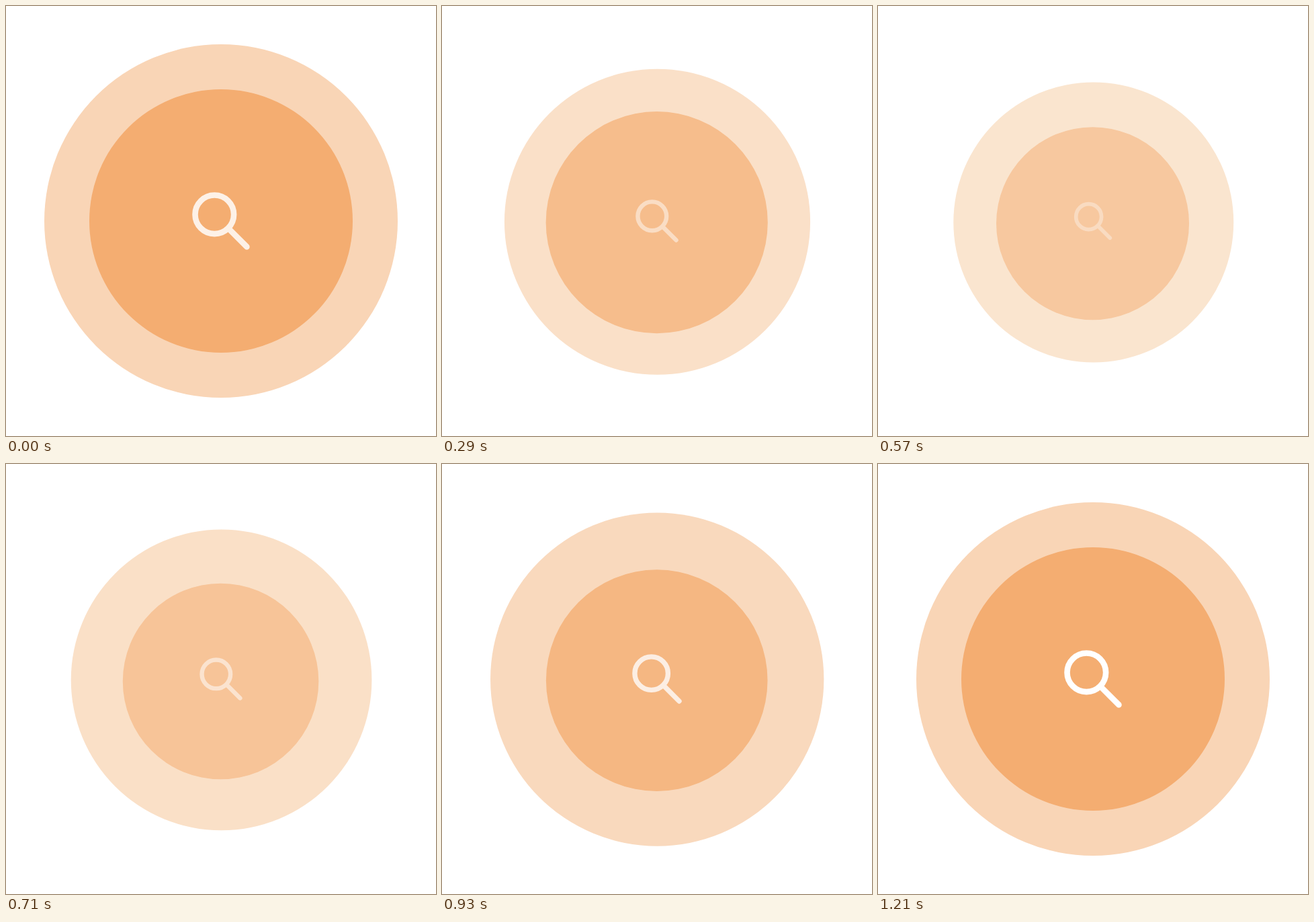
Write an HTML page that moves like this. It is 640 by 640 pixels and loops after 1.28 s.

```html
<!DOCTYPE html>
<html lang="en">
<head>
<meta charset="utf-8">
<title>Search pulse</title>
<style>
  html, body { margin: 0; width: 100%; height: 100%; overflow: hidden; background: #fff; }
  svg { display: block; width: 100%; height: 100%; }
</style>
</head>
<body>
<svg viewBox="0 0 640 640">
  <circle id="halo"/>
  <circle id="disc"/>
  <g id="lens" fill="none" stroke="#fff" stroke-width="8.6" stroke-linecap="round">
    <circle cx="-9.7" cy="-9.7" r="28.8"/>
    <path d="M11 11L38.4 38.4"/>
  </g>
</svg>
<script>
const LOOP = 1280, LAST = 17, CENTER = 320;

const smooth = p => u => { const x = u ** p; return x * x * (3 - 2 * x); };
const easeOut = p => u => 1 - (1 - u) ** p;

// Runs from one value to a low point at step `turn`, then on to the last value
const pulse = (from, low, to, turn, fall, rise) => step => step < turn
  ? from + (low - from) * fall(step / turn)
  : low + (to - low) * rise((step - turn) / (LAST - turn));

const haloSize = pulse(263, 206.6, 263, 7.5, smooth(.85), smooth(.75));
const haloFade = pulse(0, 1.08, 0, 7, easeOut(1.1), easeOut(1.55));
const discSize = pulse(196, 143.5, 196, 7.8, smooth(.87), smooth(1.45));
const discFade = pulse(0, 1.1, 0, 7.8, smooth(.87), smooth(.95));
const lensSize = pulse(1, .615, 1, 7, easeOut(1.3), easeOut(1.1));
const lensAlpha = pulse(.83, .26, 1, 7, easeOut(1.1), easeOut(1.3));

const mix = (a, b, t) => `rgb(${a.map((v, i) => Math.round(v + (b[i] - v) * t))})`;
const [halo, disc, lens] = ['halo', 'disc', 'lens'].map(id => document.getElementById(id));

function set(el, attrs) {
  for (const name in attrs) el.setAttribute(name, attrs[name]);
}

// The circles drift slightly as they shrink
function setCircle(el, r, full, dx, dy, fill) {
  const drop = full - r;
  set(el, { r, cx: CENTER + drop * dx, cy: CENTER + drop * dy, fill });
}

// Steps last 70 ms, apart from two of 80 ms
const startOf = i => 70 * i + (i > 3 ? 10 : 0) + (i > 10 ? 10 : 0);

function stepAt(ms) {
  let i = LAST;
  while (startOf(i) > ms) i--;
  return i;
}

function draw(ms) {
  const step = stepAt(ms);
  setCircle(halo, haloSize(step), 263, .014, .036,
    mix([249, 213, 182], [250, 230, 209], haloFade(step)));
  setCircle(disc, discSize(step), 196, -.009, .07,
    mix([244, 173, 113], [247, 198, 155], discFade(step)));
  set(lens, {
    transform: `translate(${CENTER} ${CENTER}) scale(${lensSize(step)})`,
    opacity: lensAlpha(step)
  });
}

const begin = performance.now();
function tick() {
  draw((performance.now() - begin) % LOOP);
  requestAnimationFrame(tick);
}
tick();
</script>
</body>
</html>
```
